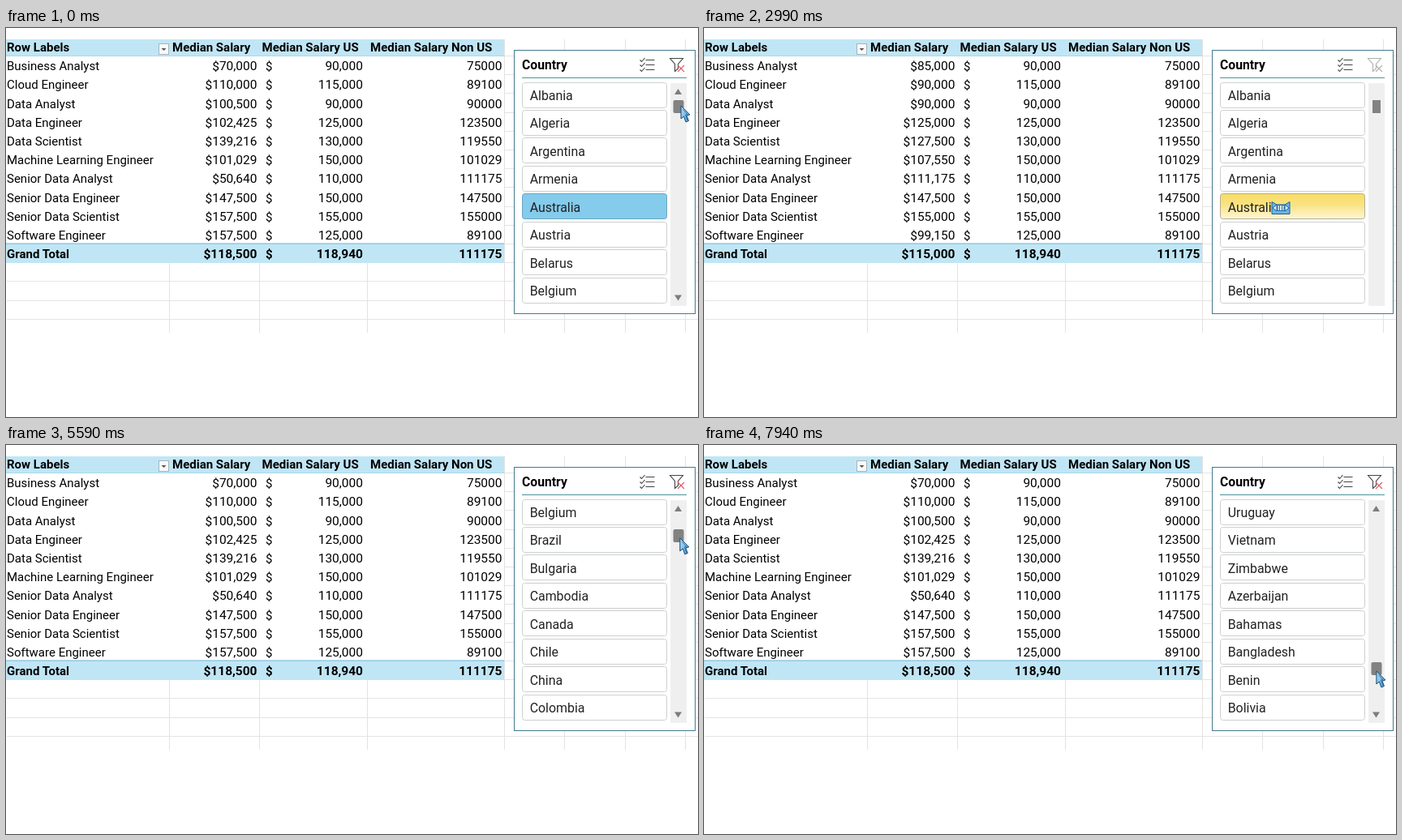
An HTML page that plays this animation: 853x480 px, repeating every 8 s.

```html
<!DOCTYPE html>
<html lang="en">
<head>
<meta charset="utf-8">
<title>Salary pivot with country slicer</title>
<style>
html, body { margin: 0; width: 100%; height: 100%; overflow: hidden; background: #fff; }
svg { display: block; width: 853px; height: 480px; font-family: Roboto, "Noto Sans", sans-serif; }
.label { font-size: 15px; }
.num { font-size: 15.5px; text-anchor: end; }
.bold { font-weight: 700; }
.item { font-size: 15.9px; fill: #222; }
</style>
</head>
<body>
<svg id="stage" viewBox="0 0 853 480">
  <defs>
    <linearGradient id="hover" x1="0" y1="0" x2="0" y2="1">
      <stop offset="0" stop-color="#f8dc62"/>
      <stop offset=".45" stop-color="#f9e384"/>
      <stop offset="1" stop-color="#fef7d8"/>
    </linearGradient>
    <linearGradient id="steel" x1="0" y1="0" x2="1" y2="1">
      <stop offset="0" stop-color="#b4dcf6"/>
      <stop offset=".5" stop-color="#84c2ec"/>
      <stop offset="1" stop-color="#4a90c4"/>
    </linearGradient>
  </defs>
  <g id="sheet"></g>
  <g id="slicer">
    <rect x="626.5" y="27.5" width="223" height="325" fill="#fff" stroke="#447a8d"/>
    <text x="636" y="51" class="bold" font-size="15.7">Country</text>
    <path d="M636 61.5H839" stroke="#4d9399"/>
    <g fill="none" stroke="#444" stroke-width="1.1">
      <path d="M788.5 39.5H799.5M788.5 45.5H799.5M788.5 51.5H799.5"/>
      <path d="M781.5 39.5l2 2 4-4.5M781.5 45.5l2 2 4-4.5M781.5 51.5l2 2 4-4.5"/>
    </g>
    <rect id="clearBg" x="814.5" y="31.5" width="25" height="26" rx="2" fill="#fbe8a4" stroke="#d9b95c"/>
    <path id="funnel" d="M818.5 37.5H834.5L828.5 44.5V50L824.5 53.5V44.5Z" fill="#fff" stroke-width="1.1"/>
    <path id="cross" d="M828 46l8 8M836 46l-8 8" stroke-width="1.1"/>
    <rect x="819" y="68" width="20" height="275" fill="#f0eff0"/>
    <path id="arrows" d="M824 82l4.5-7 4.5 7ZM824 329.500l4.5 7 4.5-7Z" fill="#7d7d7d"/>
    <rect id="thumb" fill="#828282"/>
  </g>
  <g id="arrow">
    <path d="M0 0V16L3.5 13 6 20 9.5 18.5 7 12 11 11Z" fill="url(#steel)" stroke="#184a72" stroke-linejoin="round"/>
    <path d="M2.500 4.500L8 10.500 5.500 11 8 18" fill="none" stroke="#2b75ad"/>
  </g>
  <g id="busy">
    <path d="M-11 -7.500L-5 -4H5L11 -7.500V7.500H-11Z" fill="#69b5e8" stroke="#1d5f92"/>
    <path d="M-10 0L-5 -4V4ZM10 0L5 -4V4Z" fill="#d5effc" stroke="#1d5f92"/>
    <rect x="-4" y="-3.5" width="8" height="7" fill="#dceefa" stroke="#2a6ea3"/>
    <path d="M-1.5 -3V3M1.5 -3V3" stroke="#2a6ea3"/>
  </g>
</svg>
<script>
const LOOP = 8000, ITEM_H = 34.43, ROW_H = 23.2;
const CLEARED = 1470, LISTED = 1410, PICKED = 2740, FILTERED = 3500, DRAG = 5376;
const el = id => document.getElementById(id);

function add(parent, tag, attrs, text) {
  const node = document.createElementNS("http://www.w3.org/2000/svg", tag);
  for (const key in attrs) node.setAttribute(key, attrs[key]);
  if (text !== undefined) node.textContent = text;
  parent.appendChild(node);
  return node;
}
function set(node, attrs) {
  for (const key in attrs) node.setAttribute(key, attrs[key]);
}
const show = (node, on) => set(node, { visibility: on ? "visible" : "hidden" });

// name | salary in Australia | salary everywhere | US | non US
const rows = `Business Analyst|$70,000|$85,000|90,000|75000
Cloud Engineer|$110,000|$90,000|115,000|89100
Data Analyst|$100,500|$90,000|90,000|90000
Data Engineer|$102,425|$125,000|125,000|123500
Data Scientist|$139,216|$127,500|130,000|119550
Machine Learning Engineer|$101,029|$107,550|150,000|101029
Senior Data Analyst|$50,640|$111,175|110,000|111175
Senior Data Engineer|$147,500|$147,500|150,000|147500
Senior Data Scientist|$157,500|$155,000|155,000|155000
Software Engineer|$157,500|$99,150|125,000|89100
Grand Total|$118,500|$115,000|118,940|111175`.split("\n").map(r => r.split("|"));

const countries = ("Albania,Algeria,Argentina,Armenia,Australia,Austria,Belarus,Belgium,Brazil,Bulgaria," +
  "Cambodia,Canada,Chile,China,Colombia,Costa Rica,Croatia,Czechia,Denmark,Dominican Republic," +
  "Ecuador,Egypt,Estonia,Finland,France,Georgia,Germany,Ghana,Greece,Guatemala,Hong Kong,Hungary," +
  "India,Indonesia,Ireland,Israel,Italy,Japan,Kazakhstan,Kenya,Latvia,Lebanon,Lithuania,Luxembourg," +
  "Malaysia,Malta,Mexico,Morocco,Netherlands,New Zealand,Nigeria,Norway,Pakistan,Panama,Peru," +
  "Philippines,Poland,Portugal,Puerto Rico,Qatar,Romania,Russia,Rwanda,Saudi Arabia,Senegal,Serbia," +
  "Singapore,Slovakia,Slovenia,South Africa,South Korea,Spain,Sri Lanka,Sweden,Switzerland,Taiwan," +
  "Thailand,Tunisia,Turkey,Uganda,Ukraine,United Arab Emirates,United Kingdom,United States," +
  "Uruguay,Vietnam,Zimbabwe,Azerbaijan,Bahamas,Bangladesh,Benin,Bolivia").split(",");

// Sheet: grid lines, bands and cells
const sheet = el("sheet");
const line = (d, stroke = "#e6e1e4") => add(sheet, "path", { d, stroke });
for (let i = 0; i < 15; i++) {
  const y = Math.round(34 + i * ROW_H) + 0.5;
  line(`M${i < 12 ? 614 : 1} ${y}H853`, i % 2 ? "#e6e1e4" : "#e1e7e1");
}
for (const x of [201.5, 312.5, 445.5]) line(`M${x} 290V376`);
line("M614.5 14V376");
for (const x of [688.5, 763.5, 837.5]) line(`M${x} 14V376`);

add(sheet, "rect", { x: 0, y: 14, width: 614, height: 276, fill: "#fff" });
for (const [y, h] of [[14, 20], [266, 24]])
  add(sheet, "rect", { x: 0, y, width: 614, height: h, fill: "#c0e6f5" });
line("M0 34.5H614", "#a9d9ec");
line("M0 266H614", "#6fb4d4");

[[1, "Row Labels"], [205, "Median Salary"], [315.5, "Median Salary US"], [449, "Median Salary Non US"]]
  .forEach(([x, s]) => add(sheet, "text", { x, y: 29, class: "label bold" }, s));
add(sheet, "rect", { x: 188.5, y: 19.5, width: 12, height: 13, fill: "#f8fafc", stroke: "#a9b3ba" });
add(sheet, "path", { d: "M191.5 25H197.5L194.5 28Z", fill: "#555" });

const salaries = rows.map((r, i) => {
  const y = 52.2 + i * ROW_H, bold = i === 10 ? " bold" : "";
  const cell = (x, s, kind) => add(sheet, "text", { x, y, class: kind + bold }, s);
  cell(1, r[0], "label");
  cell(320, "$", "label");
  cell(440, r[3], "num");
  cell(611.5, r[4], "num");
  return cell(309.5, r[1], "num");
});

const slicer = el("slicer");
const buttons = Array.from({ length: 8 }, (_, i) => {
  const y = 67.5 + i * ITEM_H;
  return {
    y,
    box: add(slicer, "rect", { x: 636.5, y: Math.round(y) - 0.5, width: 178, height: 31, rx: 3 }),
    text: add(slicer, "text", { x: 645.7, y: y + 21.5, class: "item" })
  };
});

const groups = [200, 1030, 1850, 2740, 3560, 4390, 5210, 6100, 6920, 7750, LOOP];
function snap(t) {
  if (t < 200) return 0;
  const g = groups.findIndex((s, i) => t >= s && t < groups[i + 1]);
  const start = groups[g], first = g % 2 ? 60 : 130;
  const off = t - start, pair = Math.floor(off / 190) * 190;
  return Math.min(start + pair + (off - pair >= first ? first : 0), groups[g + 1] - first);
}

function thumbY(t) {
  return t < DRAG ? 89 : 89 + (t - DRAG) * 0.0698;
}

const path = [[0, 832, 96], [200, 832, 96], [520, 842, 84], [1030, 835, 54], [1220, 829, 48],
  [1850, 829, 48], [2500, 711, 222], [4390, 711, 222], [4900, 840, 104], [5210, 832, 101], [DRAG, 831, 100]];
function pointer(t) {
  if (t >= DRAG) return [831 - (t - DRAG) / 1200, thumbY(t) + 11];
  const i = path.findIndex(p => p[0] > t);
  const [t0, x0, y0] = path[i - 1], [t1, x1, y1] = path[i];
  const u = (t - t0) / (t1 - t0), k = u * u * (3 - 2 * u);
  return [x0 + (x1 - x0) * k, y0 + (y1 - y0) * k];
}

function render(time) {
  const t = snap(time);
  const [x, y] = pointer(t);
  const within = (l, top, r, b) => x >= l && x <= r && y >= top && y <= b;
  const unfiltered = t >= CLEARED && t < FILTERED;
  const all = t >= LISTED && t < PICKED;

  salaries.forEach((node, i) => { node.textContent = rows[i][unfiltered ? 2 : 1]; });

  const top = thumbY(t), firstItem = Math.round((top - 89) * 84 / 179);
  buttons.forEach((b, i) => {
    const n = firstItem + i, over = within(636, b.y, 814, b.y + 31), on = all || n === 4;
    b.text.textContent = countries[n] || "";
    set(b.box, {
      fill: over ? "url(#hover)" : on ? "#84cbec" : "#fff",
      stroke: over ? "#b3ad94" : on ? "#6ba5be" : "#cdd0d0"
    });
  });

  show(el("clearBg"), within(814, 31, 840, 58));
  set(el("funnel"), { stroke: unfiltered ? "#b0b0b0" : "#444" });
  set(el("cross"), { stroke: unfiltered ? "#b0b0b0" : "#e65a60" });

  const track = within(819, 68, 839, 343);
  show(el("arrows"), track);
  set(el("thumb"), track
    ? { x: 822.5, y: top, width: 13, height: 16, rx: 2 }
    : { x: 824, y: top, width: 10, height: 16, rx: 0 });

  const wait = t >= 2800 && t < FILTERED;
  show(el("arrow"), !wait);
  show(el("busy"), wait);
  const place = { transform: `translate(${x.toFixed(1)} ${y.toFixed(1)})` };
  set(el("arrow"), place);
  set(el("busy"), place);
}

const begin = performance.now();
function tick() {
  render((performance.now() - begin) % LOOP);
  requestAnimationFrame(tick);
}
tick();
</script>
</body>
</html>
```
